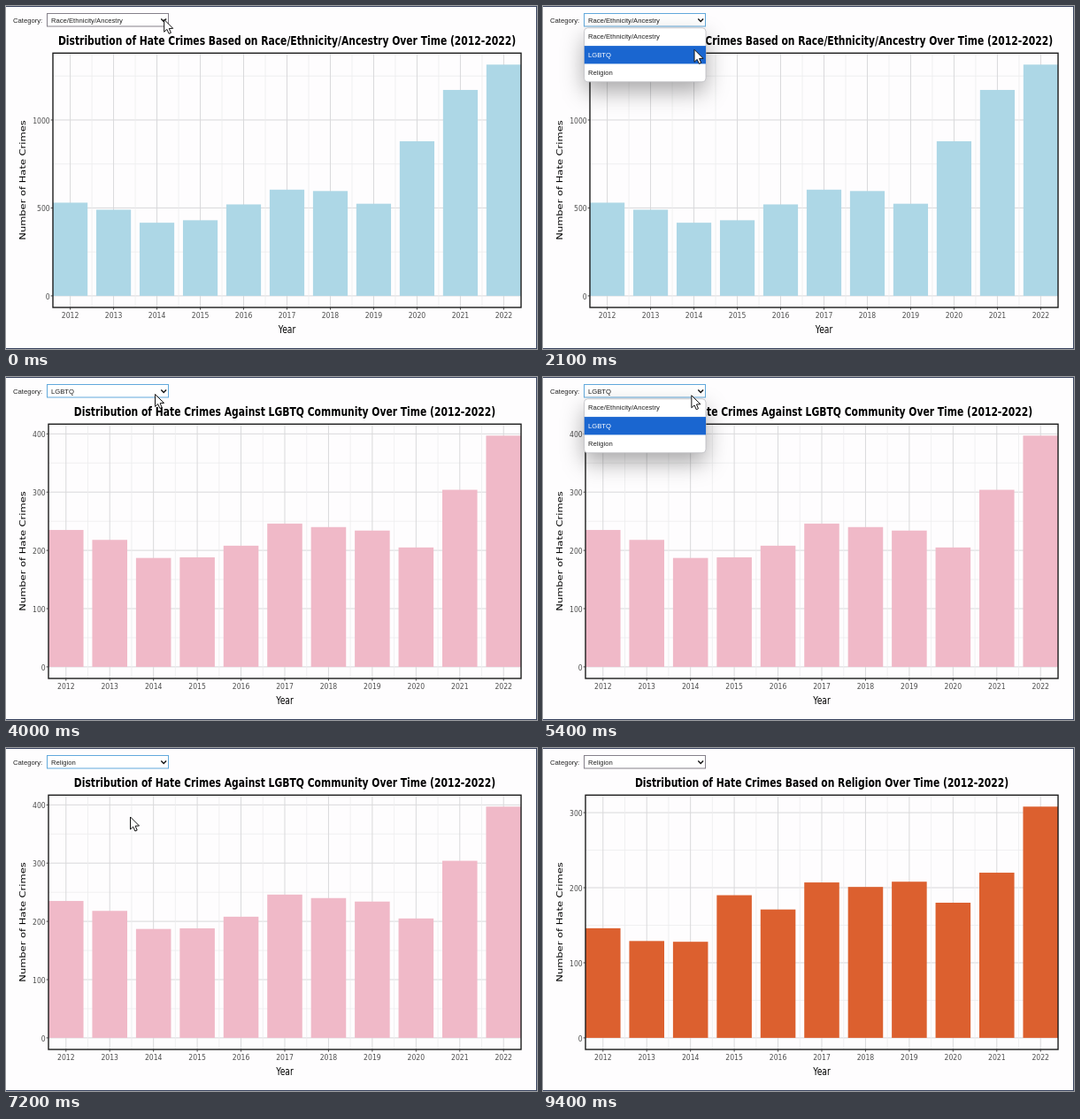
An HTML page with a canvas that plays this animation: 600 by 388 pixels, repeating every 9.5 s.

```html
<!DOCTYPE html>
<html lang="en">
<head>
<meta charset="utf-8">
<title>Hate crimes by category</title>
<style>
  html, body { margin: 0; width: 100%; height: 100%; overflow: hidden; background: #fefdfe; }
  canvas { display: block; width: 600px; height: 388px; }
</style>
</head>
<body>
<canvas id="stage" width="600" height="388"></canvas>
<script>
const ctx = document.getElementById('stage').getContext('2d');
const LOOP = 9500;
const PLOT_FONT = '"DejaVu Sans", sans-serif';
const UI_FONT = '"Liberation Sans", Arial, sans-serif';
const SQUEEZE = 0.803; // the plot is shown narrower than it was laid out

const OPTIONS = ['Race/Ethnicity/Ancestry', 'LGBTQ', 'Religion'];
const PANEL = { top: 53.3, right: 582, bottom: 341, zero: 327.9, peak: 66.3 };

const CHARTS = [
  {
    title: 'Based on Race/Ethnicity/Ancestry', color: '#add7e6', left: 53, step: 500,
    values: [530, 490, 416, 430, 520, 604, 596, 524, 879, 1171, 1315]
  },
  {
    title: 'Against LGBTQ Community', color: '#f0b9c8', left: 48, step: 100,
    values: [235, 218, 187, 188, 208, 246, 240, 234, 205, 304, 397]
  },
  {
    title: 'Based on Religion', color: '#dc602f', left: 48, step: 100,
    values: [146, 129, 128, 190, 171, 207, 201, 208, 180, 220, 308]
  }
];

// Pointer stops: time, x, y
const PATH = [
  [0, 178.7, 15.3], [1300, 178.7, 15.3], [2000, 171, 49.3], [3300, 171, 49.3],
  [3900, 168.5, 19.5], [5350, 168.5, 19.5], [5900, 141.5, 73], [6000, 141.5, 73],
  [6300, 140.5, 78], [8700, 140.5, 78]
];

// The latest value whose start time has passed
const pick = (t, steps) => steps.reduce((v, [at, next]) => (t >= at ? next : v), steps[0][1]);

function pointerAt(t) {
  const i = PATH.findIndex(p => p[0] > t);
  if (i < 0) return null;
  const [t0, x0, y0] = PATH[i - 1], [t1, x1, y1] = PATH[i];
  const k = (t - t0) / (t1 - t0), e = k * k * (3 - 2 * k);
  return { x: x0 + (x1 - x0) * e, y: y0 + (y1 - y0) * e };
}

function line(x1, y1, x2, y2, color, width) {
  ctx.strokeStyle = color;
  ctx.lineWidth = width;
  ctx.beginPath();
  ctx.moveTo(x1, y1);
  ctx.lineTo(x2, y2);
  ctx.stroke();
}

function plotText(str, x, y, size, { align = 'center', color = '#000', weight = '', turn = 0 } = {}) {
  ctx.save();
  ctx.translate(x, y);
  ctx.scale(SQUEEZE, 1);
  ctx.rotate(turn);
  ctx.font = `${weight} ${size}px ${PLOT_FONT}`;
  ctx.textAlign = align;
  ctx.fillStyle = color;
  ctx.fillText(str, 0, 0);
  ctx.restore();
}

function uiText(str, x, y, color = '#222') {
  ctx.font = `7.67px ${UI_FONT}`;
  ctx.textAlign = 'left';
  ctx.fillStyle = color;
  ctx.fillText(str, x, y);
}

function drawChart({ title, color, left, step, values }) {
  const { top, right, bottom, zero, peak } = PANEL;
  const max = Math.max(...values);
  const pitch = (right - left) / (values.length - 0.2);
  const xOf = i => left + (i + 0.4) * pitch;
  const yOf = v => zero - v / max * (zero - peak);
  const mid = (left + right) / 2;

  for (let v = 0; yOf(v) > top; v += step / 2) {
    const major = v % step === 0;
    line(left, yOf(v), right, yOf(v), major ? '#d9d9db' : '#ececee', major ? 1 : 0.8);
  }
  for (let i = 0; i <= values.length - 1; i += 0.5) {
    const major = i % 1 === 0;
    line(xOf(i), top, xOf(i), bottom, major ? '#d9d9db' : '#ececee', major ? 1 : 0.8);
  }

  ctx.fillStyle = color;
  values.forEach((v, i) => {
    ctx.fillRect(xOf(i) - 0.4 * pitch, yOf(v), 0.8 * pitch, zero - yOf(v));
  });

  ctx.strokeStyle = '#1c1c1c';
  ctx.lineWidth = 1.4;
  ctx.strokeRect(left, top, right - left, bottom - top);

  const label = { color: '#4d4d4d' };
  values.forEach((v, i) => {
    line(xOf(i), bottom, xOf(i), bottom + 2.6, '#333', 0.9);
    plotText(String(2012 + i), xOf(i), 352.5, 9.57, label);
  });
  for (let v = 0; yOf(v) > top; v += step) {
    line(left - 2.4, yOf(v), left, yOf(v), '#333', 0.9);
    plotText(String(v), left - 3.3, yOf(v) + 3.6, 9.57, { ...label, align: 'right' });
  }

  plotText(`Distribution of Hate Crimes ${title} Over Time (2012-2022)`, mid, 43.5, 13.4, { weight: 'bold' });
  plotText('Year', mid, 370.3, 11.48);
  plotText('Number of Hate Crimes', 21.5, 197, 11.48, { turn: -Math.PI / 2 });
}

function drawSelect(choice, focused) {
  uiText('Category:', 8, 18.7);
  ctx.fillStyle = '#fff';
  ctx.fillRect(46, 8, 138, 15);
  ctx.strokeStyle = focused ? '#62a9dc' : '#85808a';
  ctx.lineWidth = 1;
  ctx.strokeRect(46.5, 8.5, 137, 14.5);
  uiText(OPTIONS[choice], 51, 18.7);

  ctx.strokeStyle = '#111';
  ctx.lineWidth = 1.4;
  ctx.beginPath();
  ctx.moveTo(175.3, 14.5);
  ctx.lineTo(178.2, 17.4);
  ctx.lineTo(181.1, 14.5);
  ctx.stroke();
}

function drawList(active) {
  const x = 46.5, y = 24.8, w = 137.5, h = 61, row = 20.3;
  ctx.save();
  ctx.beginPath();
  ctx.roundRect(x, y, w, h, 4);
  ctx.shadowColor = 'rgba(0,0,0,0.34)';
  ctx.shadowBlur = 26;
  ctx.shadowOffsetY = 11;
  ctx.fillStyle = '#fff';
  ctx.fill();
  ctx.shadowColor = 'transparent';
  ctx.strokeStyle = '#bdbdc2';
  ctx.lineWidth = 0.8;
  ctx.stroke();
  ctx.clip();
  ctx.fillStyle = '#1a66d0';
  ctx.fillRect(x, y + active * row, w, row);
  ctx.restore();
  OPTIONS.forEach((name, i) => {
    uiText(name, 51, 37.4 + i * row, i === active ? '#fff' : '#222');
  });
}

function drawPointer({ x, y }) {
  const shape = [[0, 0], [0, 14], [3.2, 11.1], [5.4, 16], [7.7, 15], [5.6, 10.2], [10, 10]];
  ctx.beginPath();
  shape.forEach(([dx, dy]) => ctx.lineTo(x + dx, y + dy));
  ctx.closePath();
  ctx.fillStyle = '#fff';
  ctx.fill();
  ctx.strokeStyle = '#111';
  ctx.lineWidth = 1;
  ctx.stroke();
}

function draw(t) {
  ctx.fillStyle = '#fefdfe';
  ctx.fillRect(0, 0, 600, 388);

  drawChart(CHARTS[pick(t, [[0, 0], [3500, 1], [7500, 2]])]);
  drawSelect(pick(t, [[0, 0], [2500, 1], [6900, 2]]), t >= 1100 && t < 8700);

  const pointer = pointerAt(t);
  const open = pick(t, [[0, false], [600, true], [2500, false], [5300, true], [6900, false]]);
  if (open) {
    const current = t < 5300 ? 0 : 1;
    const over = Math.floor((pointer.y - 24.8) / 20.3);
    drawList(over < 0 ? current : Math.min(over, 2));
  }

  line(0, 0.5, 600, 0.5, '#36415c', 1);
  line(599.5, 0, 599.5, 388, '#36415c', 1);
  line(0, 387.5, 600, 387.5, '#36415c', 1);
  if (pointer) drawPointer(pointer);
}

const start = performance.now();
function tick() {
  draw((performance.now() - start) % LOOP);
  requestAnimationFrame(tick);
}
tick();
</script>
</body>
</html>
```
